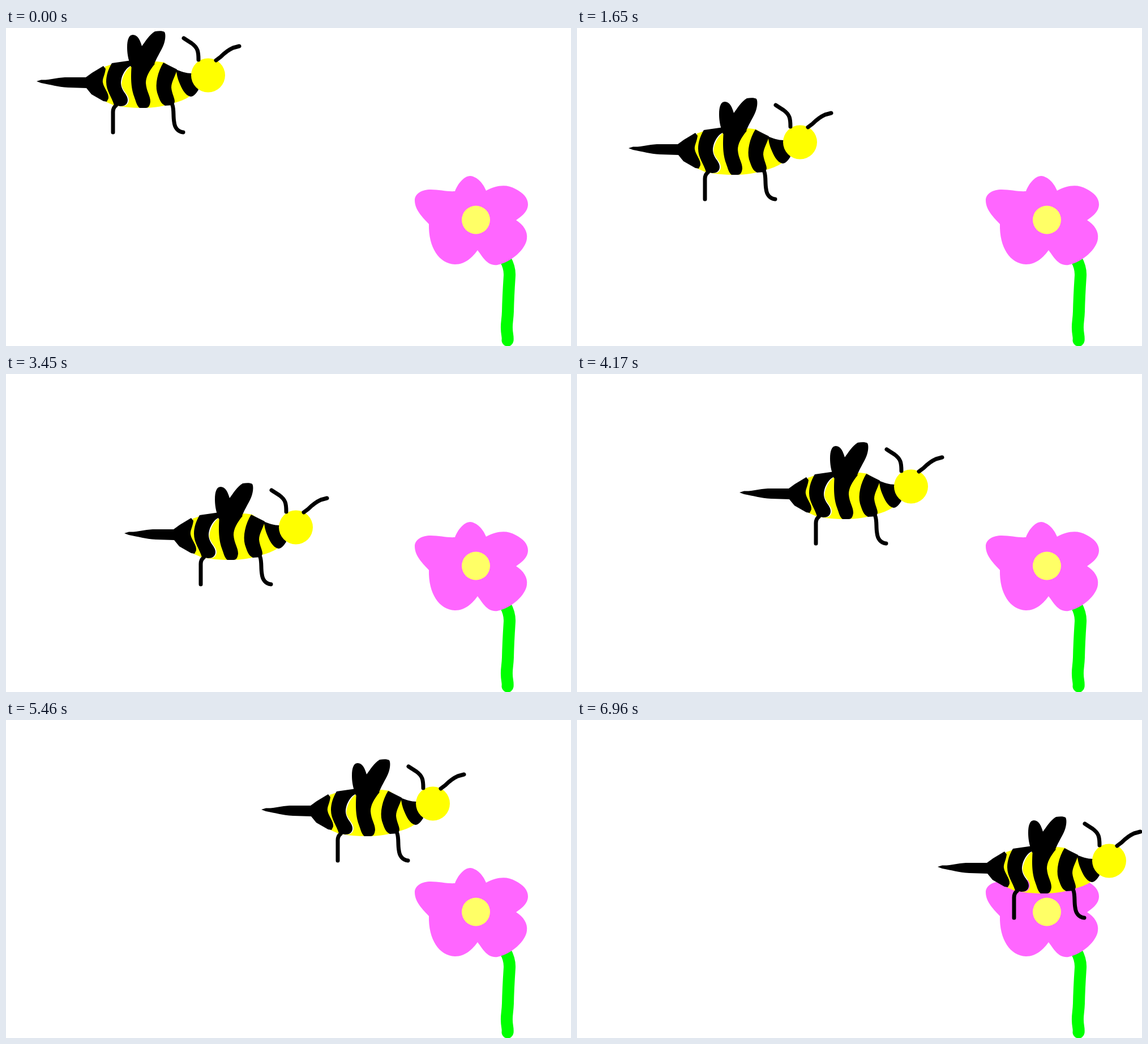
Recreate the animation shown at these times as an HTML page with a canvas. Size 998x561 px, loop 8.55 s.

```html
<!DOCTYPE html>
<html lang="en">
<head>
<meta charset="utf-8">
<title>Bee and flower</title>
<style>
  html, body { margin: 0; width: 100%; height: 100%; overflow: hidden; background: #fff; }
  canvas { display: block; }
</style>
</head>
<body>
<canvas id="stage" width="998" height="561"></canvas>
<script>
const ctx = document.getElementById('stage').getContext('2d');
const LOOP = 8550, STEP = 30;

// Flight legs: last step and the path flown at even speed until then.
const legs = [
  [34, 'M0 0C-6 -16 2 -25 14 -25C34 -25 49 12 49 38C49 60 40 74 26 91'],
  [55, 'M26 91C10 104 -9 110 -9 121C-9 130 -4 133 4 133C16 133 26 123 37 118'],
  [90, 'M37 118C80 102 130 92 202 77'],
  [116, 'M202 77L206 76L153 192'],
  [139, 'M153 192L233 115'],
  [182, 'M233 115C262 89 272 35 312 35C345 35 362 54 397 64'],
  [232, 'M397 64C420 69 470 63 500 65C548 68 583 110 583 165']
].map(([end, d]) => {
  const path = document.createElementNS('http://www.w3.org/2000/svg', 'path');
  path.setAttribute('d', d);
  return { end, path, length: path.getTotalLength() };
});
const LAST = legs[legs.length - 1].end;

function beeAt(step) {
  let start = 0;
  for (const { end, path, length } of legs) {
    if (step <= end) return path.getPointAtLength(length * (step - start) / (end - start));
    start = end;
  }
}

const petals = new Path2D(`M793 288C797 277 808 261 820 261C832 262 843 274 848 287
  C866 277 885 275 900 284C914 291 922 300 922 311C922 324 911 332 901 339
  C914 347 922 359 920 372C918 390 893 413 868 418C850 420 842 404 833 392
  C825 403 812 417 793 417C765 416 746 387 747 346C738 336 722 322 722 304
  C722 292 735 285 750 285C765 285 780 289 793 288Z`);
const stem = new Path2D('M882 408C887 417 890 427 889.5 437C888 460 887 475 886.5 500C886 515 884 520 884.5 530C884.5 540 887 544 886 551');

const yellow = [
  'M175 68L190 63L192 137L176 130L181 122L170 97Z',
  'M222 66C211 74 205 87 204 99C206 112 217 117 217 127C217 133 213 138 206 138L188 136C205 139 220 141 245 141L245 62Z',
  'M240 62C255 59 268 58 280 61L303 78L327 119C315 127 306 130 297 132C280 138 262 141 240 141Z'
].map(d => new Path2D(d));

const black = [
  // sting and tail
  'M54 94L62 91.5C78 92 88 88 104 87L141 87L152 79L172 67L176 72C175 82 170 89 171 96C173 107 182 114 181 124L178 130L172 129L151 117L142 106L110 105C90 104 80 100 62 97L58 95.5Z',
  // stripes
  'M187 62L222 57L222 66C211 70 203 85 203 98C204 112 215 117 215 127C215 135 209 138 202 138L191 136C187 122 177 111 177 95C177 83 181 72 187 62Z',
  'M222 63L263 63C253 76 247 86 247 97C248 112 255 119 255 130C254 137 252 141 247 141L236 141C231 137 230 131 226 120C221 105 220 90 222 63Z',
  'M278 61L302 73C300 84 292 94 292 105C293 116 298 123 298 130L296 136L281 137C273 133 271 126 267 114C263 99 268 77 278 61Z',
  'M300 73C310 77 318 80 328 80L340 109C336 115 332 121 326 121C316 119 310 106 306 96C303 88 302 84 301 77Z',
  // wings
  'M221 69C215 54 214 42 214 34C214 21 217 12 224 12C233 12 237 22 240 32C246 24 253 12 263 6C270 5 277 5 280 7C283 12 281 25 277 33C272 44 266 52 261 66L232 66Z'
].map(d => new Path2D(d));

// legs and antennae
const limbs = new Path2D(`M194 137C190 140 189 143 189 148V184
  M294 136C297 145 295 155 297 166C298 175 303 183 313 184
  M314 18L328 27C339 35 340 42 340 56
  M371 57L379 51C386 44 392 39 401 35L412 32`);

function disc(x, y, r, color) {
  ctx.fillStyle = color;
  ctx.beginPath();
  ctx.arc(x, y, r, 0, Math.PI * 2);
  ctx.fill();
}

function fillAll(paths, color) {
  ctx.fillStyle = color;
  for (const path of paths) ctx.fill(path);
}

function line(path, width, color) {
  ctx.lineCap = ctx.lineJoin = 'round';
  ctx.lineWidth = width;
  ctx.strokeStyle = color;
  ctx.stroke(path);
}

function drawFlower() {
  line(stem, 21, '#00ff00');
  fillAll([petals], '#ff66ff');
  disc(830, 338.5, 25, '#ffff66');
}

function drawBee({ x, y }) {
  ctx.save();
  ctx.translate(Math.round(x), Math.round(y));
  fillAll(yellow, '#ffff00');
  fillAll(black, '#000');
  disc(357, 83.5, 30, '#ffff00');
  line(limbs, 7, '#000');
  ctx.restore();
}

const began = performance.now();

function draw() {
  const time = Math.max(0, performance.now() - began) % LOOP;
  ctx.fillStyle = '#fff';
  ctx.fillRect(0, 0, 998, 561);
  drawFlower();
  drawBee(beeAt(Math.min(LAST, Math.floor(time / STEP))));
  requestAnimationFrame(draw);
}
draw();
</script>
</body>
</html>
```
